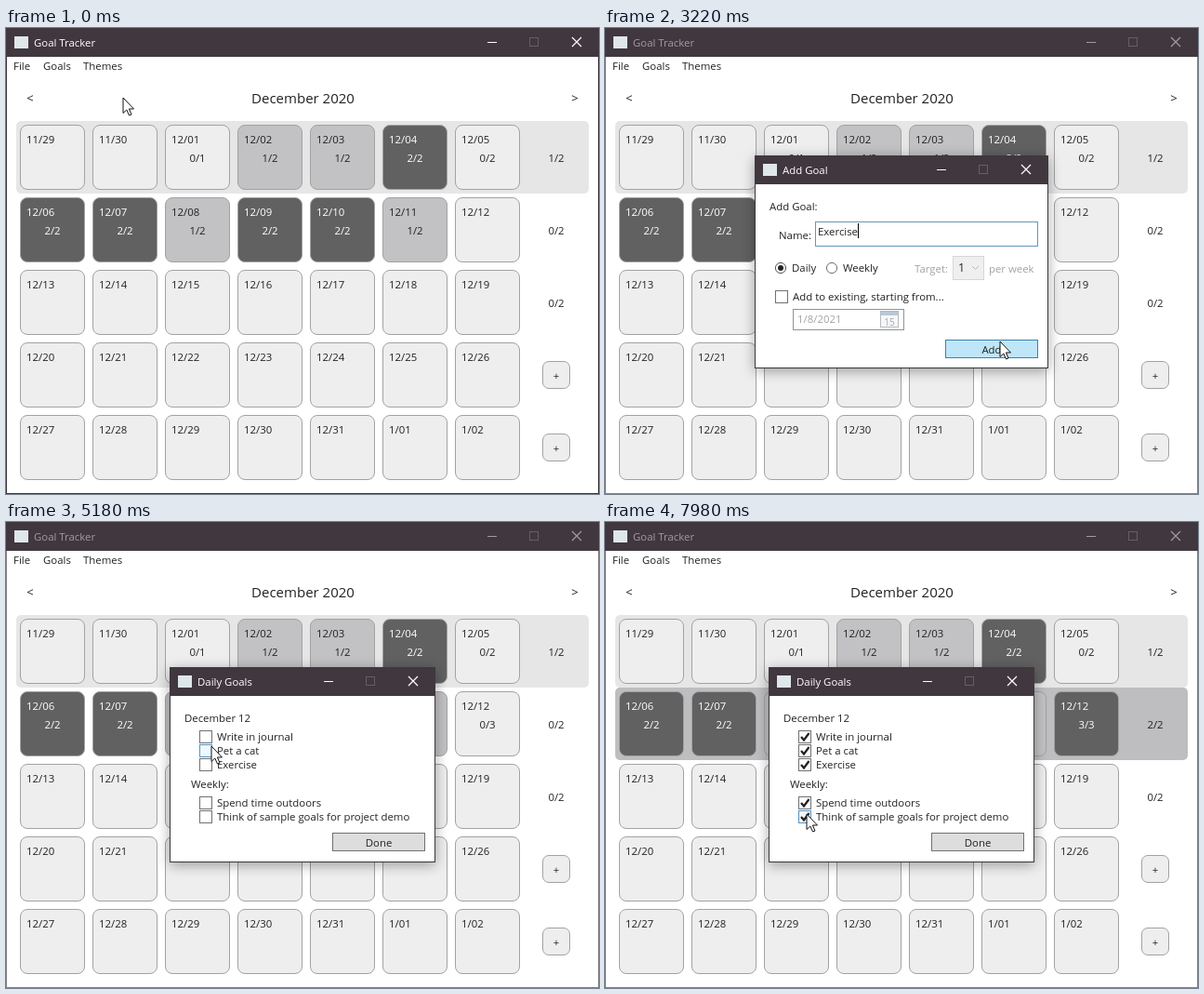
Write an HTML page that moves like this. It is 638 px wide and 501 px high and loops after 8 s.

```html
<!DOCTYPE html>
<html lang="en">
<head>
<meta charset="utf-8">
<title>Goal Tracker</title>
<style>
html, body { margin: 0; width: 100%; height: 100%; overflow: hidden; background: #fff; }
svg { display: block; font: 11.4px "Open Sans", "Noto Sans", sans-serif; }
.dialog { filter: drop-shadow(0 3px 7px rgba(0, 0, 0, .35)); }
</style>
</head>
<body>
<svg id="stage" width="638" height="501" viewBox="0 0 638 501"></svg>
<script>
const LOOP = 8000, STEP = 70;
const INK = '#222', PALE = '#a3a3a3', LIGHT = '#eee', MID = '#c2c2c4', DARK = '#616161';
const stage = document.getElementById('stage');
const ruler = document.createElement('canvas').getContext('2d');
ruler.font = '11.4px "Open Sans", "Noto Sans", sans-serif';

const counts = ['', '', '0/1', '1/2', '1/2', '2/2', '0/2', '2/2', '2/2', '1/2', '2/2', '2/2', '1/2'];
const goals = [
  ['Write in journal', 224, 5530],
  ['Pet a cat', 239, 6020],
  ['Exercise', 254, 6510],
  ['Spend time outdoors', 295, 7280],
  ['Think of sample goals for project demo', 310, 7840]
];
const keyTimes = [1680, 1820, 1960, 2100, 2240, 2380, 2520, 2590];
const addSpan = [700, 3430], dailySpan = [4340, LOOP + 999];

// Pointer stops: time, x, y
const stops = [
  [0, 126, 75], [70, 126, 75], [420, 55, 42], [560, 55, 42], [700, 62, 64], [840, 62, 64],
  [1330, 280, 216], [3010, 280, 216], [3220, 425, 337], [3710, 425, 337], [4130, 522, 241],
  [4550, 522, 241], [5180, 221, 241], [5390, 215, 231], [5600, 215, 231], [5880, 215, 246],
  [6160, 215, 246], [6370, 214, 261], [6580, 214, 261], [6930, 218, 304], [7350, 218, 304],
  [7560, 217, 314], [LOOP, 217, 314]
];

const clamp = v => Math.max(0, Math.min(1, v));
const ease = v => v * v * (3 - 2 * v);

function pointerAt(t) {
  const i = stops.findIndex(s => s[0] > t);
  const [a, b] = [stops[i - 1], stops[i]];
  const k = ease((t - a[0]) / (b[0] - a[0]));
  return [a[1] + (b[1] - a[1]) * k, a[2] + (b[2] - a[2]) * k];
}

const within = ([px, py], x, y, w, h) => px >= x && px <= x + w && py >= y && py <= y + h;

const text = (s, x, y, fill = INK, anchor = 'start', size = 11.4) =>
  `<text x="${x}" y="${y}" fill="${fill}" text-anchor="${anchor}" font-size="${size}">${s}</text>`;
const mid = (s, x, y, fill, size) => text(s, x, y, fill, 'middle', size);
const fillBox = (x, y, w, h, fill, r = 0) =>
  `<rect x="${x}" y="${y}" width="${w}" height="${h}" rx="${r}" fill="${fill}"/>`;
const box = (x, y, w, h, fill, stroke, r = 0) =>
  `<rect x="${x + .5}" y="${y + .5}" width="${w - 1}" height="${h - 1}" rx="${r}" fill="${fill}" stroke="${stroke}"/>`;
const line = (d, stroke, width = 1) =>
  `<path d="${d}" fill="none" stroke="${stroke}" stroke-width="${width}"/>`;

function frame(x, y, w, h, title, active) {
  const ink = active ? '#fff' : '#a19ca1', r = x + w;
  return box(x, y, w, h, '#fff', active ? '#3c363b' : '#858285') +
    fillBox(x, y, w, 31, '#40373f') +
    fillBox(x + 9, y + 9, 15, 13, '#dfe7ea') +
    text(title, x + 30, y + 20, ink) +
    line(`M${r - 120} ${y + 15.5}h10`, ink) +
    box(r - 75, y + 10, 10, 10, 'none', '#665e65') +
    line(`M${r - 29} ${y + 10}l10 10m0 -10l-10 10`, ink, 1.2);
}

function checkBox(x, y, on, hover) {
  return box(x, y, 14, 14, hover ? '#f0f8ff' : '#fff', hover ? '#5593c4' : '#707070') +
    (on ? line(`M${x + 3} ${y + 7}l3 3.5l5.5 -7.5`, '#222', 2.3) : '');
}

function button(label, x, y, enabled, hover) {
  const [fill, stroke, ink] = !enabled ? ['#f4f4f4', '#adb2b5', '#838383']
    : hover ? ['#bee6f8', '#3c7fb1', INK] : ['#ddd', '#707070', INK];
  return box(x, y, 100, 20, fill, stroke) + mid(label, x + 50, y + 14.5, ink);
}

function calendar(t) {
  const done = goals.map(g => t >= g[2]);
  const daily = done.slice(0, 3).filter(Boolean).length;
  const weekly = done.slice(3).filter(Boolean).length;
  let out = fillBox(11, 100, 616, 78, '#e6e6e6', 5);
  if (weekly) out += fillBox(11, 178, 616, 78, weekly > 1 ? '#bebec0' : '#e6e6e6', 5);
  for (let i = 0; i < 35; i++) {
    const x = 15 + i % 7 * 78, y = 104 + Math.floor(i / 7) * 78;
    const day = new Date(2020, 10, 29 + i);
    const count = i === 13 && t >= dailySpan[0] ? `${daily}/3` : counts[i] || '';
    const [n, all] = count.split('/');
    const fill = !+n ? LIGHT : n === all ? DARK : MID;
    const ink = fill === DARK ? '#fff' : INK;
    out += box(x, y, 70, 70, fill, '#a2a2a2', 7.5) +
      text(`${day.getMonth() + 1}/${String(day.getDate()).padStart(2, '0')}`, x + 7, y + 20, ink) +
      mid(count, x + 35, y + 40, ink);
  }
  ['1/2', `${weekly}/2`, '0/2'].forEach((s, r) => out += mid(s, 592, 144 + r * 78));
  for (const y of [358, 436]) out += box(577, y, 30, 30, LIGHT, '#a2a2a2', 6.5) + mid('+', 592, y + 20);
  return out;
}

function addDialog(t, p) {
  const typed = 'Exercise'.slice(0, keyTimes.filter(k => t >= k).length);
  const focus = t >= 1400, caret = 229.5 + Math.round(ruler.measureText(typed).width - .5);
  return frame(161, 137, 316, 229, 'Add Goal', true) +
    text('Add Goal:', 177, 196) + text('Name:', 187, 227) +
    box(226, 208, 240, 27, '#fff', focus ? '#6497b8' : '#abadb3') +
    text(typed, 229, 223) + (focus ? line(`M${caret} 210v16`, '#000') : '') +
    '<circle cx="189" cy="258" r="5.6" fill="#fff" stroke="#555"/><circle cx="189" cy="258" r="3" fill="#222"/>' +
    '<circle cx="244" cy="258" r="5.6" fill="#fff" stroke="#707070"/>' +
    text('Daily', 201, 262) + text('Weekly', 256, 262) +
    text('Target:', 333, 263, PALE) + box(374, 245, 34, 26, '#efefef', '#d6d6d6') +
    text('1', 380, 262, INK, 'start', 12.5) + line('M395 256l3.5 3.5l3.5 -3.5', '#bbb') +
    text('per week', 413, 263, PALE) +
    checkBox(183, 282, false, within(p, 183, 282, 14, 14)) +
    text('Add to existing, starting from...', 202, 293) +
    box(202, 302, 120, 23, '#fff', '#8f9295') + text('1/8/2021', 207, 317, PALE) +
    box(296, 304, 20, 18, '#f6f7f8', '#b5bac0') + fillBox(297, 305, 18, 4, '#b9c7d6') +
    mid('15', 306, 319.5, '#a4a9ae', 10) +
    button('Add', 366, 335, typed !== '', within(p, 366, 335, 100, 20));
}

function dailyDialog(t, p) {
  return frame(176, 156, 286, 210, 'Daily Goals', true) +
    text('December 12', 192, 215) + text('Weekly:', 199, 286) +
    goals.map(([s, y, at]) =>
      checkBox(208, y, t >= at, within(p, 208, y, 13.9, 13.9)) + text(s, 227, y + 11)).join('') +
    button('Done', 351, 334, true, false);
}

function popup([from, to], t, cx, cy, content) {
  if (t < from || t >= to + 140) return '';
  const k = ease(Math.min(clamp((t - from + STEP) / 210), clamp((to + 140 - t) / 210)));
  const s = .9 + .1 * k;
  const fade = k < 1 ? ` opacity="${k}" transform="translate(${cx} ${cy}) scale(${s}) translate(${-cx} ${-cy})"` : '';
  return `<g class="dialog"${fade}>${content(t)}</g>`;
}

function pointer(t, [x, y]) {
  if (t >= 1680 && t < 3080) return '';
  if (t < 1680 && within([x, y], 226, 208, 240, 27) && t > 1000)
    return line(`M${x - 3.5} ${y - 7.5}h7M${x} ${y - 7.5}v15M${x - 3.5} ${y + 7.5}h7`, '#222', 1.4);
  return `<path transform="translate(${x} ${y})" d="M0 0V16.5L3.8 13L6.5 19L9 18L6.4 12H11.5Z" fill="#fff" stroke="#111"/>`;
}

function draw(t) {
  const p = pointerAt(t);
  const active = t < addSpan[0] || t >= addSpan[1] && t < 4200;
  stage.innerHTML = frame(0, 0, 638, 501, 'Goal Tracker', active) +
    text('File', 8, 45) + text('Goals', 40, 45) + text('Themes', 83, 45) +
    mid('&lt;', 26, 80, INK, 13) + mid('&gt;', 612, 80, INK, 13) +
    mid('December 2020', 319.5, 81, INK, 15) + calendar(t) +
    popup(addSpan, t, 319, 251, u => addDialog(u, p)) +
    popup(dailySpan, t, 319, 261, u => dailyDialog(u, p)) +
    pointer(t, p);
}

let last = -1;
function tick(now) {
  const t = Math.floor(now % LOOP / STEP) * STEP;
  if (t !== last) draw(last = t);
  requestAnimationFrame(tick);
}
tick(performance.now());
</script>
</body>
</html>
```
